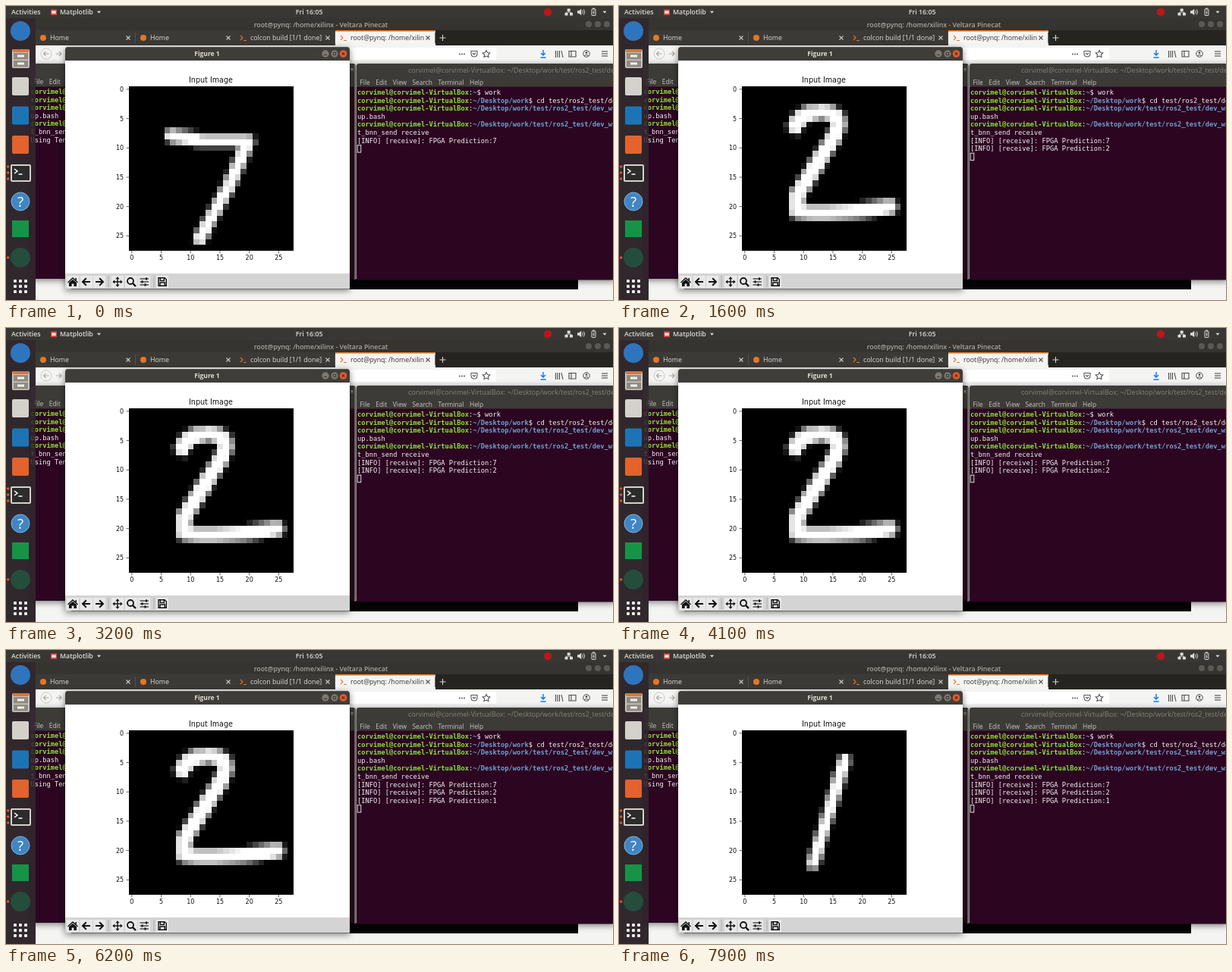
Write an HTML page with a canvas that moves like this. It is 800 px wide and 388 px high and loops after 8 s.

```html
<!DOCTYPE html>
<html lang="en">
<head>
<meta charset="utf-8">
<title>Digit recognition desktop</title>
<style>
html, body { margin: 0; width: 100%; height: 100%; overflow: hidden; background: #2b2a28; }
#stage { position: relative; width: 800px; height: 388px; overflow: hidden; }
svg { position: absolute; left: 0; top: 0; display: block; }
canvas { position: absolute; left: 161.8px; top: 106.2px; width: 216.8px; height: 216.8px; image-rendering: pixelated; }
text { white-space: pre; }
.ui { font-family: "Open Sans", "Noto Sans", sans-serif; font-size: 8.8px; }
.semi { font-weight: 600; }
.menu { font-family: "Open Sans", "Noto Sans", sans-serif; font-size: 8.4px; word-spacing: 5.4px; }
.plot { font-family: "DejaVu Sans", sans-serif; font-size: 8px; }
.mono { font-family: "DejaVu Sans Mono", monospace; font-size: 8.73px; fill: #f4f2f4; }
.user { fill: #8ae234; font-weight: bold; }
.path { fill: #729fcf; font-weight: bold; }
.line { fill: none; stroke-width: 1.1; }
.window { filter: drop-shadow(0 2px 4px rgba(0, 0, 0, .5)); }
</style>
</head>
<body>
<div id="stage">
<svg id="desk" width="800" height="388" viewBox="0 0 800 388"></svg>
<canvas id="digit" width="28" height="28"></canvas>
</div>
<script>
const LOOP = 8000;
const PERIOD = 4800;     // time between two predictions
const LEAD = 3500;       // time the first one has been on screen at the start
const PLOT_DELAY = 200;  // the plot follows the printed line
const PREDICTIONS = [7, 2, 1];
const USER = 'corvimel';
const HOST = USER + '@' + USER + '-VirtualBox';

// Pen strokes on a 28 by 28 grid
const STROKES = {
  7: { width: 2.15, d: 'M7.1 8.4L12 9.1L20.3 9.3L17.2 16.5L12 25.9' },
  2: { width: 2.6, d: 'M9 6.8Q10 4.3 13.5 4.3Q18 4.2 15.7 8.5L9.4 18.5V21.2Q16 22.2 25.2 20.5' },
  1: { width: 2, d: 'M17.5 4.9L12.1 22.8' }
};

const attrs = o => Object.entries(o).map(([k, v]) => ` ${k}="${v}"`).join('');
const rect = (x, y, width, height, fill, more = {}) => `<rect${attrs({ x, y, width, height, fill, ...more })}/>`;
const disc = (cx, cy, r, fill, more = {}) => `<circle${attrs({ cx, cy, r, fill, ...more })}/>`;
const ring = (x, y, r, stroke, width = 1) => disc(x, y, r, 'none', { stroke, 'stroke-width': width });
const shape = (d, fill) => `<path${attrs({ d, fill })}/>`;
const line = (d, stroke, width = 1.1) => `<path${attrs({ d, stroke, class: 'line', style: 'stroke-width:' + width })}/>`;
const text = (x, y, s, fill, cls = 'ui', more = {}) => `<text${attrs({ x, y, fill, class: cls, ...more })}>${s}</text>`;
const group = (s, more) => `<g${attrs(more)}>${s}</g>`;
const mid = { 'text-anchor': 'middle' };
const cross = (x, y, c, r = 2.5) => line(`M${x - r} ${y - r}l${2 * r} ${2 * r}m0 ${-2 * r}l${-2 * r} ${2 * r}`, c);
const bars = (x, y, w, gap, c) => [0, 1, 2].map(i => line(`M${x} ${y + i * gap}h${w}`, c)).join('');
// Horizontal arrow with its tip at x, pointing left (dir -1) or right (dir 1)
const arrow = (x, y, dir, len, head, c, width) =>
  line(`M${x} ${y}h${-dir * len}M${x - dir * head} ${y - head}l${dir * head} ${head}l${-dir * head} ${head}`, c, width);
const rowY = i => 117.4 + i * 10.52;

function prompt(dir, command = '') {
  return `<tspan class="user">${HOST}</tspan>:<tspan class="path">${dir}</tspan>$ ${command}`;
}

function terminal(x, width, bottom, rows, dy = 0) {
  return rect(x, 76, width, 31, '#3c3b37', { rx: 3 })
    + rect(x, 106.5, width, bottom - 106.5, '#2c0621')
    + text(x + 4.5, 104.2 + dy, 'File Edit View Search Terminal Help', '#c9c6be', 'menu')
    + rows.map((s, i) => text(x + 1, rowY(i) + dy, s, '', 'mono')).join('');
}

function tab(x, title, icon) {
  const dark = icon === 'active';
  const ink = dark ? '#33322f' : '#dedcd7';
  let s = rect(x, 32, 132, 20, dark ? '#f4f4f3' : '#3b3a36');
  if (dark) s += rect(x, 32, 132, 1.6, '#e87524');
  if (icon === 'dot') s += disc(x + 10, 42, 4, '#e87524');
  else s += line(`M${x + 7} 39l3 3l-3 3m4 .5h4`, '#e87524');
  s += text(x + (icon === 'dot' ? 19 : 20), 45.3, title, ink);
  s += rect(x + 117, 34, 15, 18, dark ? '#f4f4f3' : '#3b3a36');
  return s + cross(x + 122, 42, dark ? '#55534f' : '#cbc9c4') + rect(x + 131, 35, .8, 14, '#5a5852');
}

function browser() {
  const ink = '#4d4c4a';
  let s = rect(39, 16, 761, 16, '#353430') + rect(39, 32, 761, 20, '#252420');
  s += text(415, 27.5, 'root@pynq: /home/xilinx - Veltara Pinecat', '#aaa79f', 'ui semi', mid);
  for (const x of [768, 780, 792]) s += disc(x, 24, 4, '#5b5953');
  s += tab(39, 'Home', 'dot') + tab(171, 'Home', 'dot');
  s += tab(302, 'colcon build [1/1 done] [', 'shell') + tab(434, 'root@pynq: /home/xilinx', 'active');
  s += line('M571.5 42h8M575.5 38v8', '#d8d6d1');
  s += rect(39, 52, 761, 336, '#f4f4f3') + rect(90, 55, 556, 16, '#fff');
  s += ring(53, 63, 7, '#bbb9b5', .7) + arrow(49.5, 63, -1, 7, 3, '#aaa8a4') + arrow(73, 63, 1, 7, 3, '#aaa8a4');
  for (const x of [598, 601, 604]) s += disc(x, 63.5, .95, '#555');
  s += line('M613 59.5h8v3c0 6-8 6-8 0zM615 62l2 2l2-2', '#555');
  s += line('M633 58.5l1.5 3l3.3.4l-2.4 2.4l.6 3.3l-3-1.6l-3 1.6l.6-3.3l-2.4-2.4l3.3-.4z', '#555');
  s += line('M708 58v7m-3-3l3 3l3-3M704.5 68h7', '#1277e3', 1.4);
  s += line('M724.5 59v9M727 59v9M729.5 59v9M732 59l2 9', ink);
  s += line('M742 59.5h9v7.5h-9zM745 59.5v7.5', ink);
  s += ring(765, 63, 4.3, ink) + disc(765, 61.7, 1.4, ink) + line('M762.5 66q2.5-3 5 0', ink);
  return s + bars(785, 60, 8, 3, ink) + rect(86, 360, 668, 14, '#050505');
}

function terminals() {
  const work = '~/Desktop/work', ws = work + '/test/ros2_test/dev_ws';
  const setup = [prompt('~', 'work'), prompt(work, 'cd test/ros2_test/dev_ws'), prompt(ws), 'up.bash', prompt(ws)];
  const left = terminal(31.5, 429, 360, [...setup, 't_bnn_send send', 'Using TensorFlow backend'], -1)
    + rect(459, 78, 2, 283, '#77746f') + cross(456, 84, '#a19d95', 1.6);
  const answers = PREDICTIONS.map((n, i) =>
    text(463, rowY(6 + i), `[INFO] [receive]: FPGA Prediction:${n}`, '', 'mono answer')).join('');
  const right = terminal(462, 340, 361.5, [...setup, 't_bnn_send receive'])
    + text(530, 88.3, `${HOST}: ${ws}`, '#858279', 'ui', { style: 'font-size:9px' }) + answers
    + rect(463.2, -7.4, 4.6, 9.5, 'none', { id: 'cursor', stroke: '#f4f2f4', 'stroke-width': .9 });
  return group(left, { class: 'window' }) + group(right, { class: 'window' });
}

function toolbar() {
  const c = '#111';
  let s = rect(78, 353, 375, 20.5, '#d5d4d4');
  for (const x of [88, 106, 123, 147, 165, 182, 206]) s += rect(x - 8, 356, 16, 16, '#e9e8e8');
  for (const x of [134.5, 194.5]) s += rect(x, 356, 1, 15, '#aaa9a9');
  s += line('M81.5 365l6.5-6l6.5 6M92.2 359v3', c, 1.5) + shape('M83 365.3l5-4.4l5 4.4v4.7h-3.6v-3.5h-2.8v3.5h-3.6z', c);
  s += arrow(101, 364, -1, 10, 4.8, c, 2) + arrow(128, 364, 1, 10, 4.8, c, 2);
  for (let a = 0; a < 360; a += 90) {
    s += group(line('M147 364v-5', c, 1.4) + shape('M147 357.3l2.6 3h-5.2z', c), { transform: `rotate(${a} 147 364)` });
  }
  s += ring(164, 363, 4, c, 1.8) + line('M167 366l4 4', c, 2.4);
  s += bars(176.5, 360, 11.5, 4, c);
  [184, 178.5, 182.5].forEach((x, i) => s += rect(x, 358.4 + i * 4, 2, 3.2, c));
  return s + line('M201 358.8h8l2.3 2.3v8.2h-10.3zM203.3 359v3.5h5v-3.5M203 369v-4h6.3v4', c, 1.4);
}

function figure() {
  let s = shape('M78 72v-14q0-4 4-4h367q4 0 4 4v14z', '#3f3d39') + rect(82, 54, 367, .8, '#5b5953');
  s += text(265, 66.2, 'Figure 1', '#dfdbd2', 'ui', { ...mid, style: 'font-weight:700;font-size:8.5px' });
  for (const x of [421, 433]) s += disc(x, 63, 4.7, '#7d7970');
  s += disc(444.5, 63, 4.8, '#e9582b') + cross(444.5, 63, '#33322e', 1.7);
  s += line('M419 64.5h4M431.3 61.3h3.4v3.4h-3.4z', '#33322e', .9);
  s += rect(78, 72, 375, 281, '#fff') + toolbar();
  s += text(270, 101, 'Input Image', '#111', 'plot', { ...mid, style: 'font-size:9.6px' });
  for (let n = 0; n <= 25; n += 5) {
    const at = (n + .5) * 7.74;
    s += line(`M158.5 ${106 + at}h3.5M${162 + at} 323v3.5`, '#222', .7);
    s += text(155.2, 109 + at, n, '#111', 'plot', { 'text-anchor': 'end' });
    s += text(162 + at, 335, n, '#111', 'plot', mid);
  }
  return group(s, { class: 'window' });
}

function dock() {
  let s = rect(0, 16, 39, 372, '#33282f', { opacity: .84 });
  s += disc(19, 33, 13, '#2f75bd');
  s += rect(8, 57, 23, 25, '#c9c5bd', { rx: 2 }) + rect(9, 57, 21, 4, '#d9743d', { rx: 1 });
  for (const y of [62, 72]) s += rect(10, y, 19, 8.5, '#8f8b83') + rect(15, y + 2.5, 9, 3, '#f3f1ec');
  ['#d4d1ca', '#1d74b5', '#e3622d'].forEach((c, i) => s += rect(8, 94 + i * 38.5, 22, 24, c, { rx: 2 }));
  s += rect(6, 209, 27, 23, '#d4d2cc', { rx: 2 }) + rect(8, 211, 23, 19, '#2b2c2b');
  s += line('M11 215l4 3l-4 3M16.5 222h5', '#fff', 1.5);
  s += disc(19, 258, 12, '#4186c3') + ring(19, 258, 12, '#83b3de');
  s += text(19, 264.5, '?', '#fff', 'ui', { ...mid, style: 'font-size:19px' });
  s += rect(8, 283, 22, 22, '#159447') + disc(19, 332, 13, '#244d3d');
  for (const y of [212, 220, 228, 332]) s += disc(2.7, y, 1.7, '#e95420');
  for (let i = 0; i < 9; i++) s += rect(10 + i % 3 * 7, 361 + (i / 3 | 0) * 7, 4, 4, '#eeeeec', { rx: 1.3 });
  return s;
}

function topBar() {
  const c = '#dedcd7';
  let s = rect(0, 0, 800, 16, '#383734');
  s += text(7, 11.3, 'Activities', c, 'ui semi') + text(71, 11.3, 'Matplotlib', c, 'ui semi');
  s += rect(59, 4.5, 8, 7.5, '#d9443b') + rect(60.3, 6.3, 5.4, 3.8, '#f2dfdc');
  s += shape('M120 6.8h5l-2.5 3zM786.5 6.8h5l-2.5 3z', c);
  s += text(399.7, 11.3, 'Fri 16:05', c, 'ui semi', mid);
  s += disc(714, 8, 5.3, '#b8181c');
  s += rect(739.7, 3.5, 4, 3.5, c) + rect(736.5, 9, 4, 3.5, c) + rect(743, 9, 4, 3.5, c) + line('M741.7 7v1.5M738.5 9.2v-1h6.5v1', c, .8);
  s += shape('M753 6.3h2.2l3-2.6v8.6l-3-2.6h-2.2z', c) + line('M759.6 5.7q1.6 2.3 0 4.6M761.4 4.4q2.6 3.6 0 7.2', c, .9);
  return s + rect(772, 4, 5, 8.5, 'none', { stroke: c, rx: .6 }) + rect(773.2, 2.6, 2.6, 1.3, c) + line('M775.3 5.5l-1.5 3h1.4l-1 2.5', c, .9);
}

const desk = document.getElementById('desk');
desk.innerHTML = browser() + terminals() + figure() + dock() + topBar();

const answers = desk.querySelectorAll('.answer');
const cursor = document.getElementById('cursor');
const pen = document.getElementById('digit').getContext('2d');
pen.lineCap = pen.lineJoin = 'round';
pen.strokeStyle = '#fff';

function drawDigit(digit) {
  const { width, d } = STROKES[digit];
  pen.fillRect(0, 0, 28, 28);
  pen.lineWidth = width;
  pen.stroke(new Path2D(d));
}

const indexAt = t => Math.floor((t + LEAD) / PERIOD);

function show(t) {
  const last = indexAt(t);
  drawDigit(PREDICTIONS[indexAt(t - PLOT_DELAY)]);
  answers.forEach((row, i) => row.setAttribute('visibility', i <= last ? 'visible' : 'hidden'));
  cursor.setAttribute('transform', `translate(0 ${rowY(7 + last)})`);
}

const start = performance.now();
function tick() {
  show((performance.now() - start) % LOOP);
  requestAnimationFrame(tick);
}
tick();
</script>
</body>
</html>
```
